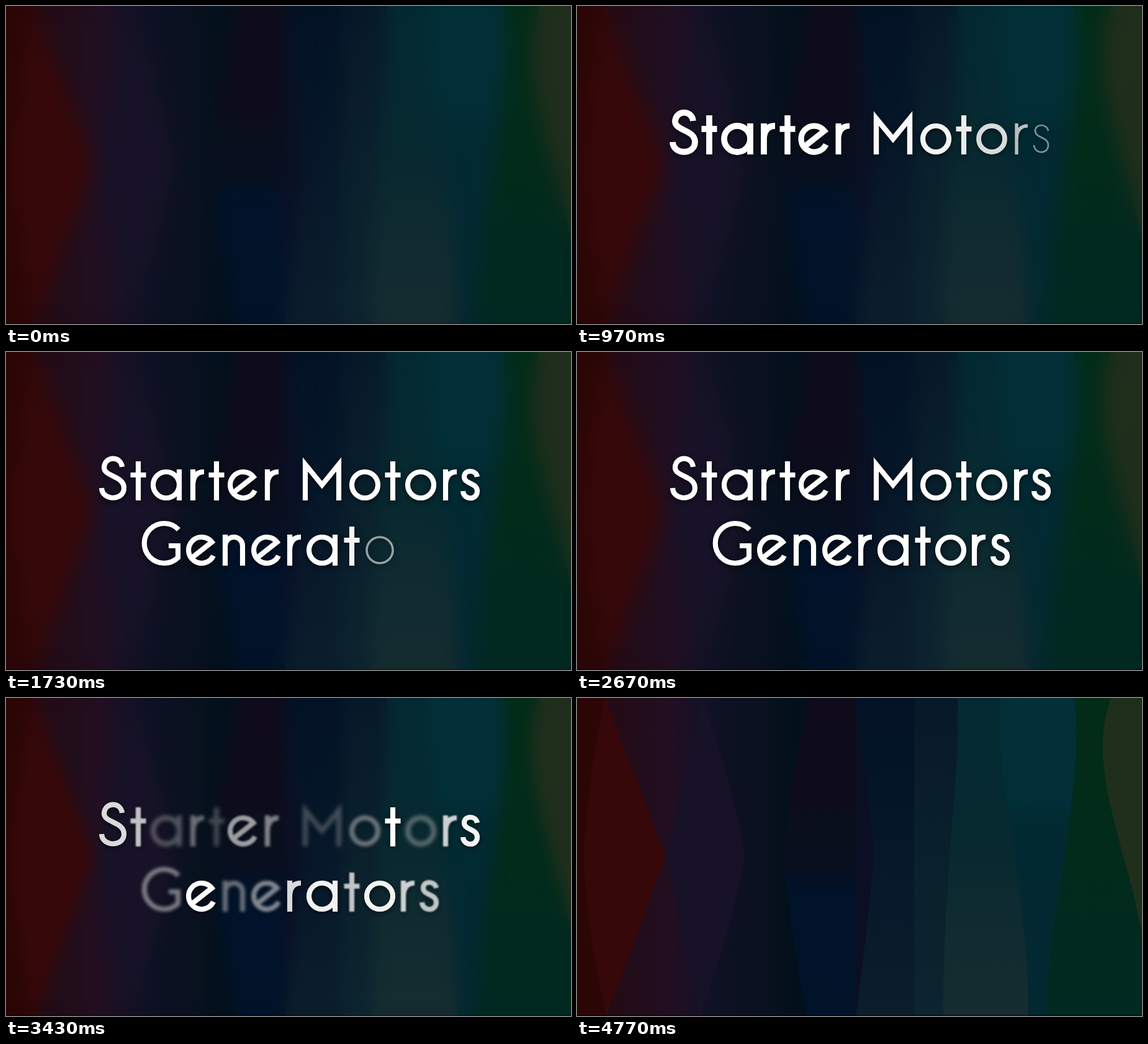
These frames come from a looping animation (910 by 512 pixels, 6010 ms). An HTML page with a canvas:

```html
<!DOCTYPE html>
<html lang="en">
<head>
<meta charset="utf-8">
<title>Starter Motors, Generators</title>
<style>
  html, body { margin: 0; width: 100%; height: 100%; overflow: hidden; background: #07111e; }
  canvas { display: block; width: 100vw; height: 100vh; }
</style>
</head>
<body>
<canvas id="stage" width="910" height="512" role="img" aria-label="Starter Motors Generators">Starter Motors Generators</canvas>
<script>
const W = 910, H = 512, LOOP = 6010;
const canvas = document.getElementById('stage');
const ctx = canvas.getContext('2d');

const clamp = (v, lo = 0, hi = 1) => Math.min(hi, Math.max(lo, v));
const ramp = (t, from, to) => clamp((t - from) / (to - from));

// Lettering: centre-line strokes, baseline at y = 0
const RING = 'M21 -25 A21 21 0 1 1 -21 -25 A21 21 0 1 1 21 -25 Z ';
const GLYPHS = {
  S: 'M15 -54 C13 -72 -13 -72 -14 -53 C-14 -38 18 -40 18 -20 C18 1 -17 1 -18 -20',
  s: 'M11 -38 C9 -50 -10 -50 -10 -38 C-10 -26 11 -29 11 -15 C11 0 -11 0 -12 -15',
  t: 'M0 -63 V0 M-12.5 -41 H12.5',
  a: RING + 'M21 -50 V0',
  o: RING,
  r: 'M0 -50 V0 M0 -26 Q1 -46 18 -46',
  e: 'M-16.5 -12 L16.5 -38 A21 21 0 1 0 19 -16',
  n: 'M0 -50 V0 M0 -32 A14 14 0 0 1 28 -32 V0',
  M: 'M-27 0 V-58 L0 -25 L27 -58 V0',
  G: 'M23 -58 A32 32 0 1 0 22 -13 V-32 H7'
};
const paths = {};
for (const key in GLYPHS) paths[key] = new Path2D(GLYPHS[key]);

const LINES = [
  { text: 'Starter Motors', y: 239, first: 0,
    x: [172, 213, 258, 301, 339, 382, 421, 0, 509, 578, 623, 668, 708, 748],
    out: [425, 355, 40, 110, 5, 250, 180, 0, 5, 110, 530, 75, 390, 495] },
  { text: 'Generators', y: 344, first: 15,
    x: [255, 315, 353, 420, 457, 509, 557, 602, 640, 682],
    out: [145, 530, 110, 180, 425, 495, 355, 495, 390, 355] }
];
const letters = LINES.flatMap(line => [...line.text].map((char, i) => {
  const index = line.first + i;
  return {
    path: paths[char], x: line.x[i], y: line.y, index,
    start: 230 + 2100 * (1 - Math.sqrt(1 - index / 24.5)),
    pace: 0.6 + 0.05 * index,
    leave: 2900 + line.out[i]
  };
})).filter(letter => letter.path);

const WEIGHT = 8.2, RECENTRE = 970;

function drawLetter(letter, t) {
  const age = (t - letter.start) * letter.pace;
  const gone = ramp(t, letter.leave, letter.leave + 700);
  if (age < 40 || gone >= 1) return;
  const swell = 1.6 * clamp(1.5 - letter.index / 6) * ramp(age, 240, 320) * (1 - ramp(age, 560, 760));
  ctx.save();
  ctx.translate(letter.x, letter.y + (t < RECENTRE ? 51 : 0));
  ctx.globalAlpha = (1 - (1 - clamp(age / 500)) ** 3) * (1 - gone);
  ctx.lineWidth = WEIGHT * ramp(age, 30, 240) + swell;
  ctx.strokeStyle = '#fff';
  ctx.miterLimit = 6;
  ctx.shadowColor = 'rgba(0,0,0,.65)';
  ctx.shadowBlur = 9;
  ctx.shadowOffsetY = 2;
  if (gone > 0) ctx.filter = `blur(${(gone * 4.5).toFixed(2)}px)`;
  ctx.stroke(letter.path);
  ctx.restore();
}

// Backdrop: overlapping dark glass shapes
const backdrop = document.createElement('canvas');
backdrop.width = W;
backdrop.height = H;
const bg = backdrop.getContext('2d');

function gradient(stops, x, y) {
  const g = bg.createLinearGradient(0, 0, x, y);
  stops.forEach(([at, color]) => g.addColorStop(at, color));
  return g;
}
const down = (...stops) => gradient(stops, 0, H);
const across = (...stops) => gradient(stops, W, 0);

function shape(fill, outline) {
  bg.fillStyle = fill;
  bg.fill(new Path2D(outline));
}

function paintBackdrop() {
  shape(across([0, '#2c0606'], [.05, '#240b14'], [.12, '#210d1b'], [.17, '#220f22'], [.22, '#141126'],
    [.26, '#0d1123'], [.34, '#09111f'], [.37, '#03101c'], [.4, '#03101c']), 'M0 0H910V512H0Z');
  shape('#2c0606', 'M0 0H45L10 256L46 512H0Z');
  shape('#360809', 'M45 0L143 256L47 512Q14 370 11 256Q16 130 45 0Z');
  shape('#171227', 'M201 0Q255 150 270 256Q250 370 197 512L145 256Z');
  shape(down([0, '#031226'], [.3, '#041527'], [.6, '#07192a'], [1, '#0b1e2c']), 'M449 0H543V512H449Z');
  shape(down([0, '#071928'], [.5, '#0a202c'], [1, '#0d2530']), 'M543 0H620V512H543Z');
  shape(down([0, '#0f0b1a'], [.33, '#0e0b1b'], [.38, '#0a0f1d'], [.52, '#090f1e'], [.62, '#00132a'], [1, '#001329']),
    'M375 0H449V512H370Q340 350 333 256Q340 150 375 0Z');
  shape('#0b0f24', 'M448 0Q470 150 478 256Q468 370 449 512Z');
  shape(down([0, '#032a32'], [.5, '#082930'], [.72, '#102b30'], [1, '#162c30']),
    'M613 0C616 100 603 200 600 256C594 350 590 420 590 512H740V0Z');
  shape(down([0, '#022f38'], [.33, '#022e37'], [.38, '#022a33'], [1, '#032831']),
    'M682 0C674 100 700 190 705 256C718 350 727 420 727 512H830V0Z');
  shape(down([0, '#022c17'], [.5, '#022b1a'], [.75, '#01291f'], [1, '#012921']),
    'M801 0C812 90 793 190 785 256C770 350 757 420 757 512H910V0Z');
  shape('#202e1c', 'M860 0C830 80 858 170 880 256Q900 325 910 380V0Z');
  shape('rgba(0,0,0,.45)', 'M0 510H910V512H0Z');
}

function backdropBlur(t) {
  return t >= 4770 ? 0 : 15 - 13 * ramp(t, 3000, 4230);
}

function draw(t) {
  ctx.drawImage(backdrop, 0, 0);
  const blur = backdropBlur(t);
  if (blur) {
    ctx.filter = `blur(${blur.toFixed(2)}px)`;
    ctx.drawImage(backdrop, 0, 0);
    ctx.filter = 'none';
  }
  letters.forEach(letter => drawLetter(letter, t));
}

paintBackdrop();
const origin = performance.now();
function tick() {
  draw((performance.now() - origin) % LOOP);
  requestAnimationFrame(tick);
}
tick();
</script>
</body>
</html>
```
